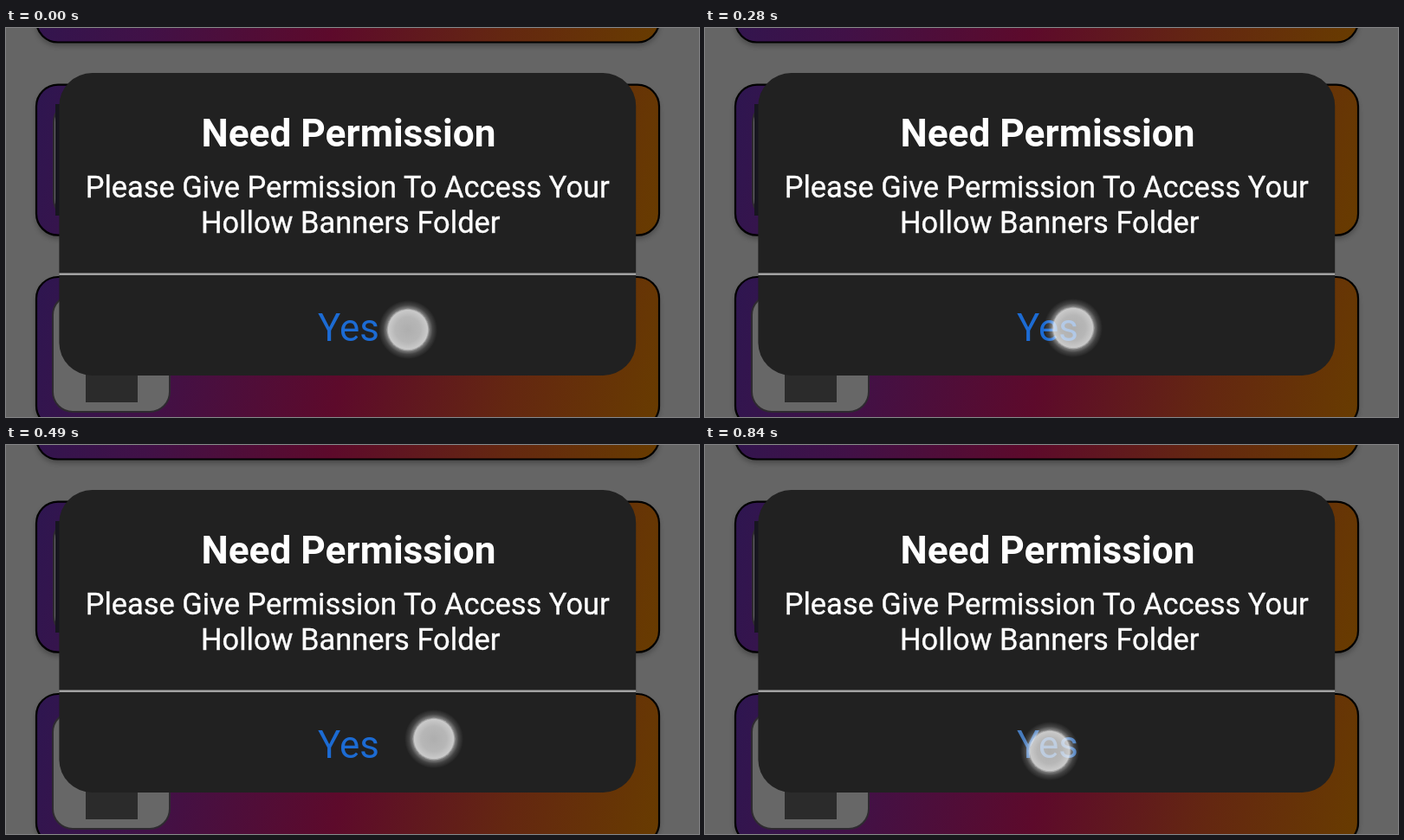
Recreate the animation shown at these times as an HTML page. Size 800 by 450 pixels, loop 910 ms.

```html
<!DOCTYPE html>
<html lang="en">
<head>
<meta charset="utf-8">
<title>Need Permission</title>
<style>
  html, body { margin: 0; width: 100%; height: 100%; overflow: hidden; background: #656565; }
  svg { display: block; width: 100vw; height: 100vh; }
  text { font-family: Roboto, sans-serif; fill: #fff; }
  .body { stroke: #fff; stroke-width: .35; }
</style>
</head>
<body>
<svg viewBox="0 0 800 450">
  <defs>
    <linearGradient id="card" gradientUnits="userSpaceOnUse" x1="0" y1="0" x2="719" y2="174">
      <stop offset="0" stop-color="#2e1650"/>
      <stop offset=".22" stop-color="#411147"/>
      <stop offset=".5" stop-color="#5d0a2b"/>
      <stop offset=".76" stop-color="#642711"/>
      <stop offset="1" stop-color="#683c00"/>
    </linearGradient>
    <radialGradient id="disc">
      <stop offset="0" stop-color="#eee" stop-opacity=".69"/>
      <stop offset=".6" stop-color="#eee" stop-opacity=".73"/>
      <stop offset=".93" stop-color="#f4f4f4" stop-opacity=".8"/>
      <stop offset="1" stop-color="#f4f4f4" stop-opacity=".5"/>
    </radialGradient>
    <radialGradient id="glow">
      <stop offset=".69" stop-color="#fff" stop-opacity="0"/>
      <stop offset=".72" stop-color="#fff" stop-opacity=".42"/>
      <stop offset=".84" stop-color="#fff" stop-opacity=".15"/>
      <stop offset="1" stop-color="#fff" stop-opacity="0"/>
    </radialGradient>
    <filter id="soft" x="-5%" y="-10%" width="110%" height="125%">
      <feGaussianBlur stdDeviation="3"/>
    </filter>
    <g id="panel">
      <rect y="4" width="719" height="174" rx="25" fill="#000" opacity=".3" filter="url(#soft)"/>
      <rect width="719" height="174" rx="25" fill="url(#card)" stroke="#000" stroke-width="2.2"/>
    </g>
    <rect id="tile" width="135" height="135" rx="23" fill="#676767" stroke="#2e2a30" stroke-width="2"/>
  </defs>

  <rect width="800" height="450" fill="#656565"/>
  <use href="#panel" x="35" y="-157.5"/>
  <use href="#panel" x="35" y="65.7"/>
  <use href="#panel" x="35" y="288"/>
  <use href="#tile" x="55" y="86"/>
  <rect x="57" y="88" width="40" height="129" fill="#17161f"/>
  <use href="#tile" x="54" y="309"/>
  <rect x="92" y="373" width="60" height="60" fill="#2b2b2b"/>

  <rect x="61.4" y="52" width="665.8" height="350" rx="38" fill="#212121"/>
  <rect x="61.4" y="283.5" width="665.8" height="2.4" fill="#a9a9a9"/>
  <text x="395.5" y="137" font-size="44.2" font-weight="700" text-anchor="middle">Need Permission</text>
  <text class="body" x="91.7" y="196" font-size="34.45">Please Give Permission To Access Your</text>
  <text class="body" x="570.5" y="236.5" font-size="34.45" text-anchor="end">Hollow Banners Folder</text>
  <text id="yes" x="360" y="362" font-size="43.8">Yes</text>

  <g id="touch">
    <circle r="34" fill="url(#glow)"/>
    <circle r="24.3" fill="url(#disc)"/>
  </g>
</svg>
<script>
const STEP = 70, STEPS = 13, PRESS = 10;
const touch = document.getElementById('touch');
const yes = document.getElementById('yes');

// Finger path: [step, x, y]
const path = [
  [0, 464, 349], [1, 443, 349], [2, 427, 348.5], [3, 421, 348],
  [4, 425, 347], [5, 437, 345], [6, 466, 342], [7, 494, 340],
  [8, 440, 348], [9, 408, 353], [10, 398, 354], [12, 398, 354]
];

function fingerAt(step) {
  const i = Math.max(1, path.findIndex(p => p[0] >= step));
  const [s0, x0, y0] = path[i - 1], [s1, x1, y1] = path[i];
  const k = (step - s0) / (s1 - s0);
  return [x0 + (x1 - x0) * k, y0 + (y1 - y0) * k];
}

function draw(ms) {
  const step = Math.floor(ms / STEP) % STEPS;
  touch.setAttribute('transform', `translate(${fingerAt(step)})`);
  yes.style.fill = step >= PRESS ? '#477bbd' : '#1c6bd3';
}

let start;
function tick(now) {
  start ??= now;
  draw(Math.max(0, now - start));
  requestAnimationFrame(tick);
}
draw(0);
requestAnimationFrame(tick);
</script>
</body>
</html>
```
